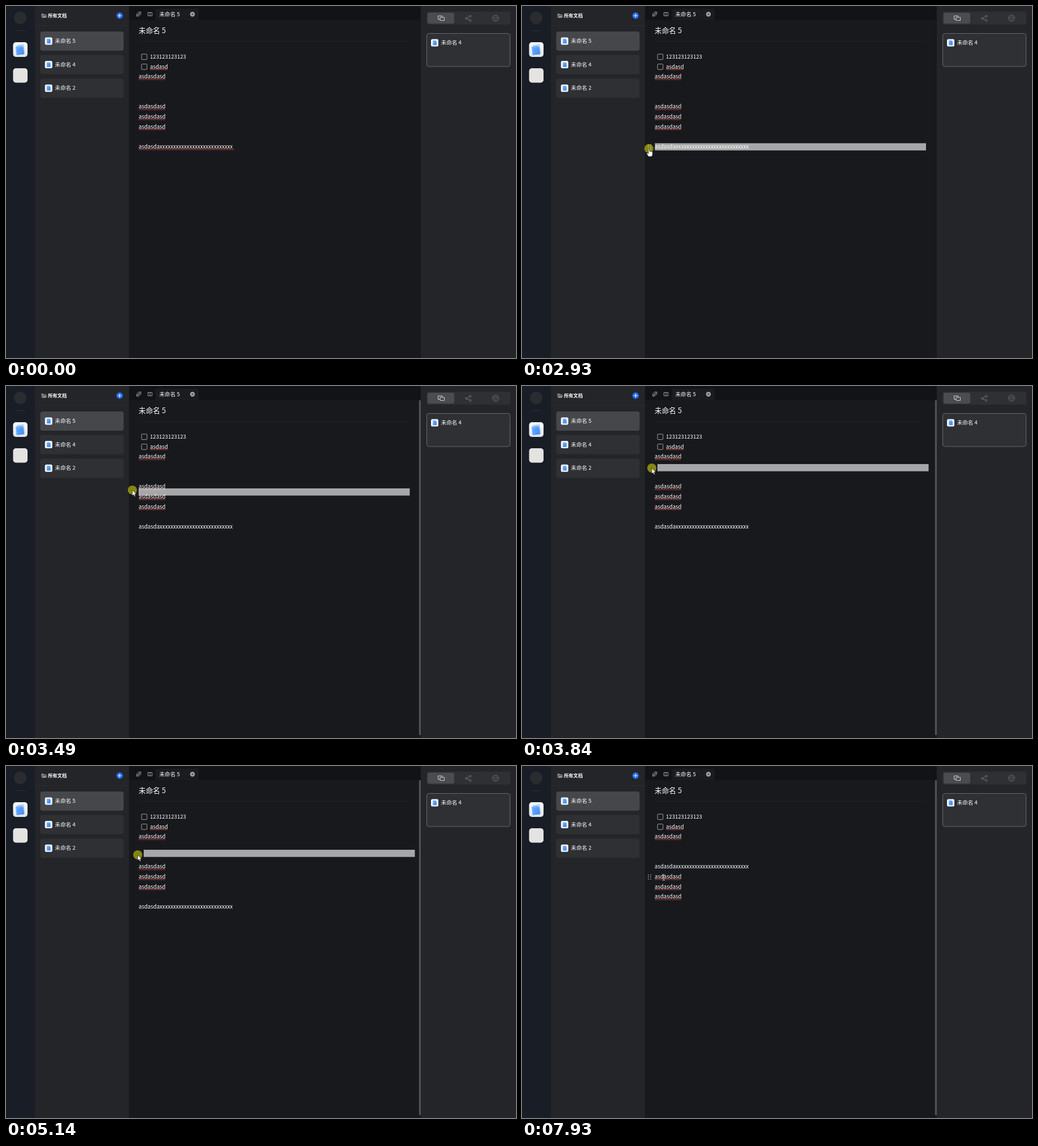
Animation of 900 by 622 pixels, one loop 8000 ms. Source, as an HTML page:

```html
<!DOCTYPE html>
<html lang="zh-CN">
<head>
<meta charset="utf-8">
<style>
html, body { margin: 0; width: 100%; height: 100%; overflow: hidden; background: #18191d; }
svg { display: block; width: 900px; height: 622px; }
text { font: 500 9.6px "Noto Sans CJK SC", "Noto Sans CJK", sans-serif; fill: #fff; white-space: pre; }
.line { fill: none; stroke: #aeafb2; stroke-width: .9; }
.spell { fill: none; stroke: #c9382f; stroke-width: 1; }
</style>
</head>
<body>
<svg viewBox="0 0 900 622">
  <defs>
    <linearGradient id="blue" x1="0" y1="0" x2="1" y2="1">
      <stop offset="0" stop-color="#7fbcff"/><stop offset="1" stop-color="#3b86f3"/>
    </linearGradient>
    <linearGradient id="tile" x1="0" y1="0" x2="0" y2="1">
      <stop offset="0" stop-color="#fff"/><stop offset="1" stop-color="#dfe3e8"/>
    </linearGradient>
    <g id="doc">
      <rect width="13" height="13" rx="2.5" fill="#f4f8fd"/>
      <path d="M3.2 2.3H8.2L10 4.2V10.8H3.2Z" fill="url(#blue)"/>
      <path d="M4.6 6.3H8.6M4.6 8.3H8.6" stroke="#3a7fe8" stroke-width=".5"/>
    </g>
  </defs>

  <!-- panels -->
  <rect width="51" height="622" fill="#191d26"/>
  <rect x="51" width="166" height="622" fill="#242529"/>
  <rect x="217" width="515" height="622" fill="#18191d"/>
  <rect x="217" width="515" height="25" fill="#121317"/>
  <rect x="732" width="168" height="622" fill="#242529"/>

  <!-- rail -->
  <circle cx="25" cy="21" r="11" fill="#2a2c30"/>
  <path d="M16 43.5H34" stroke="#2d313a"/>
  <rect x="12.5" y="64" width="25.5" height="26" rx="5" fill="url(#tile)"/>
  <g transform="rotate(-7 25 77)">
    <rect x="19.5" y="68.5" width="13" height="16" rx="1.5" fill="#a9d2ff"/>
    <path d="M17.5 71H28L31 74V86H17.5Z" fill="url(#blue)"/>
    <path d="M20 76H28M20 79H28" stroke="#4189ec" stroke-width=".8"/>
  </g>
  <rect x="12.5" y="110" width="25.5" height="25.5" rx="5" fill="#e4e3e2"/>

  <!-- document list -->
  <path d="M62.5 13.5H66L67 14.7H71V16H64.8L62.5 20.5Z M65.2 16.7H72.3L70.5 21H63Z" fill="#8b8c8f"/>
  <text x="74" y="19.8" style="font-size:8.3px;font-weight:700">所有文档</text>
  <circle cx="200.5" cy="17" r="5.8" fill="#2468f2"/>
  <path d="M197.2 17H203.8M200.5 13.7V20.3" stroke="#fff" stroke-width="1.2"/>
  <path d="M51 34.5H217" stroke="#2d2e32"/>
  <g id="list"></g>

  <!-- tabs -->
  <g class="line">
    <path d="M230.5 14L234 10.5H238V14.5L234.5 18H230.5Z" stroke-width=".7"/>
    <path d="M231 16L236.5 10.5M232 17.5L238 11.5M231 18L237.5 13" stroke-width=".8"/>
    <path d="M250.5 11.5H257.8V17.3H250.5ZM254.1 11.5V17.3"/>
  </g>
  <path d="M264 25V8Q264 4.5 267.5 4.5H336.5Q340 4.5 340 8V25Z" fill="#1b1c20"/>
  <text x="270.5" y="17.6">未命名 5</text>
  <circle cx="329" cy="14.5" r="4.2" fill="#a5a6a9"/>
  <path d="M327.5 13L330.5 16M330.5 13L327.5 16" stroke="#1b1c20"/>

  <!-- page -->
  <text x="234" y="48.4" style="font-size:12.7px;font-weight:400">未命名 5</text>
  <path d="M234 63H712" stroke="#202126"/>
  <g class="line"><rect x="239.2" y="85" width="9.6" height="9.6" rx="1"/><rect x="239.2" y="102.6" width="9.6" height="9.6" rx="1"/></g>
  <g id="page"></g>

  <!-- right panel -->
  <rect x="742" y="10" width="148" height="23" rx="4" fill="#2f3034"/>
  <rect x="744" y="12" width="47" height="19" rx="3" fill="#4b4c50"/>
  <g class="line">
    <path d="M762.5 17.5H769.5V23.5H762.5Z" stroke="#ddd"/>
    <path d="M766 20H773.5V25.5H766Z" stroke="#ddd" fill="#4b4c50"/>
    <g stroke="#77787c">
      <circle cx="812.3" cy="22" r="1.7"/><circle cx="819.3" cy="18" r="1.7"/><circle cx="819.3" cy="25.5" r="1.7"/>
      <path d="M813.8 21.1L817.8 18.9M813.8 22.8L817.8 24.7"/>
      <circle cx="864" cy="21.5" r="5.4"/>
      <path d="M864 24.6L861.2 21.8C860 20 862.6 18.4 864 20.3C865.4 18.4 868 20 866.8 21.8Z"/>
    </g>
  </g>
  <rect x="742.5" y="48.5" width="147" height="58.5" rx="4" fill="#2f3034" stroke="#68696d"/>
  <use href="#doc" x="750" y="58.5"/>
  <text x="767.7" y="68.3">未命名 4</text>

  <!-- moving parts -->
  <rect id="scroll" x="728.8" y="25" width="3.2" height="592" rx="1.2" fill="#505256"/>
  <g id="handle" fill="#b9babc"></g>
  <rect id="bar" width="478.5" height="12.7" fill="#fff" fill-opacity=".62"/>
  <circle id="press" r="8" fill="#ff0" fill-opacity=".48"/>
  <path id="arrow" d="M0 0V10L2.3 8L3.9 11.6L5.5 10.9L4 7.4H7Z" fill="#fff" stroke="#111" stroke-width=".6"/>
  <path id="beam" d="M-2 -5H-.5L0 -4.5L.5 -5H2M0 -4.5V4.5M-2 5H-.5L0 4.5L.5 5H2" fill="none" stroke="#d2d3d4" stroke-width=".9"/>
  <path id="hand" d="M-1 .6Q0 -.5 1 .6V5L2.3 4.8L3.2 5.3L4.5 5.2L5.4 6L6.5 6.4V10L5.2 14H-.8L-3.8 9.3Q-4.3 7.6 -2.8 7.8L-1 9.2Z" fill="#fff" stroke="#111" stroke-width=".6"/>
</svg>
<script>
const $ = id => document.getElementById(id);
const LOOP = 8000, PRESS = 2660, DRAG = 2930, RELEASE = 5550, DROP = 5620;

// pointer path: time, x, y
const path = [
  [260, 828, 470], [620, 640, 430], [1010, 494, 393], [1210, 388, 334],
  [1500, 300, 280], [1840, 240, 249], [2260, 224, 252], [2930, 224, 252],
  [3300, 223, 210], [3430, 223.5, 190.5], [3490, 223, 184], [3700, 224, 163],
  [3780, 228.5, 147.5], [3840, 229, 145], [4100, 245, 146], [4530, 241, 156],
  [4800, 241, 156], [5080, 232.5, 157.5], [5140, 232.5, 157], [5550, 229, 157],
  [6610, 229, 157], [7100, 232, 204], [7380, 230, 197], [7650, 261, 197], [7930, 250, 197]
];

function pointAt(t) {
  const i = path.findIndex(k => k[0] > t);
  if (i < 0) return path.at(-1).slice(1);
  if (i === 0) return path[0].slice(1);
  const [t0, x0, y0] = path[i - 1], [t1, x1, y1] = path[i];
  const p = (t - t0) / (t1 - t0);
  return [x0 + (x1 - x0) * p, y0 + (y1 - y0) * p];
}

const show = (id, on) => $(id).setAttribute("visibility", on ? "visible" : "hidden");
const move = (id, x, y) => $(id).setAttribute("transform", `translate(${x} ${y})`);

[5, 4, 2].forEach((n, i) => {
  const y = 45 + i * 41.6;
  $("list").innerHTML += `<rect x="60.5" y="${y}" width="147" height="34" rx="4" fill="${i ? "#2f3034" : "#46474b"}"/>
    <use href="#doc" x="68.7" y="${y + 10.5}"/><text x="86.3" y="${y + 20.2}">未命名 ${n}</text>`;
});

for (let i = 0; i < 6; i++)
  $("handle").innerHTML += `<rect x="${-2.7 + i % 2 * 4}" y="${-4.2 + (i >> 1) * 3.6}" width="1.5" height="1.5"/>`;

const WORD = "asdasdasd", LONG = "asdasda" + "x".repeat(27);
const rowY = n => 93 + n * 17.68;

function row(n, str, spell, x = 234) {
  const width = str === LONG ? 169 : str.length * 5.22;
  return `<text x="${x}" y="${rowY(n)}">${str}</text>` +
    (spell ? `<path class="spell" d="M${x} ${rowY(n) + 1.6}h${width}"/>` : "");
}

let stage;
function layPage(next) {
  if (next === stage) return;
  stage = next;
  const dropped = stage === 2;
  $("page").innerHTML = row(0, "123123123123", false, 254) + row(1, "asdasd", true, 254) + row(2, WORD, true) +
    [5, 6, 7].map(n => row(n + dropped, WORD, true)).join("") +
    row(dropped ? 5 : 9, LONG, stage === 0);
}

function draw(t) {
  const [x, y] = pointAt(t);
  const dragging = t >= DRAG && t < DROP;
  const onHandle = t >= 1980 && t < 3000;
  const arrow = x > 732 || t >= 3000 && t < 7450;

  layPage(t < PRESS ? 0 : t < DROP ? 1 : 2);

  show("scroll", t >= 260 && x < 732 && !onHandle);
  show("handle", t >= 1660 && t < 3000 || t >= 7450);
  move("handle", 225, t < DROP ? 249 : 196);

  // the dragged row trails the pointer a little
  const [bx, by] = pointAt(t - 60);
  show("bar", dragging);
  move("bar", bx + 10.5, by - 9.5);

  show("press", t >= PRESS && t < RELEASE);
  show("arrow", t >= 260 && arrow);
  show("hand", onHandle);
  show("beam", t >= 260 && !arrow && !onHandle);
  for (const id of ["press", "arrow", "hand", "beam"]) move(id, x, y);
}

const start = performance.now();
function tick() {
  draw((performance.now() - start) % LOOP);
  requestAnimationFrame(tick);
}
tick();
</script>
</body>
</html>
```
